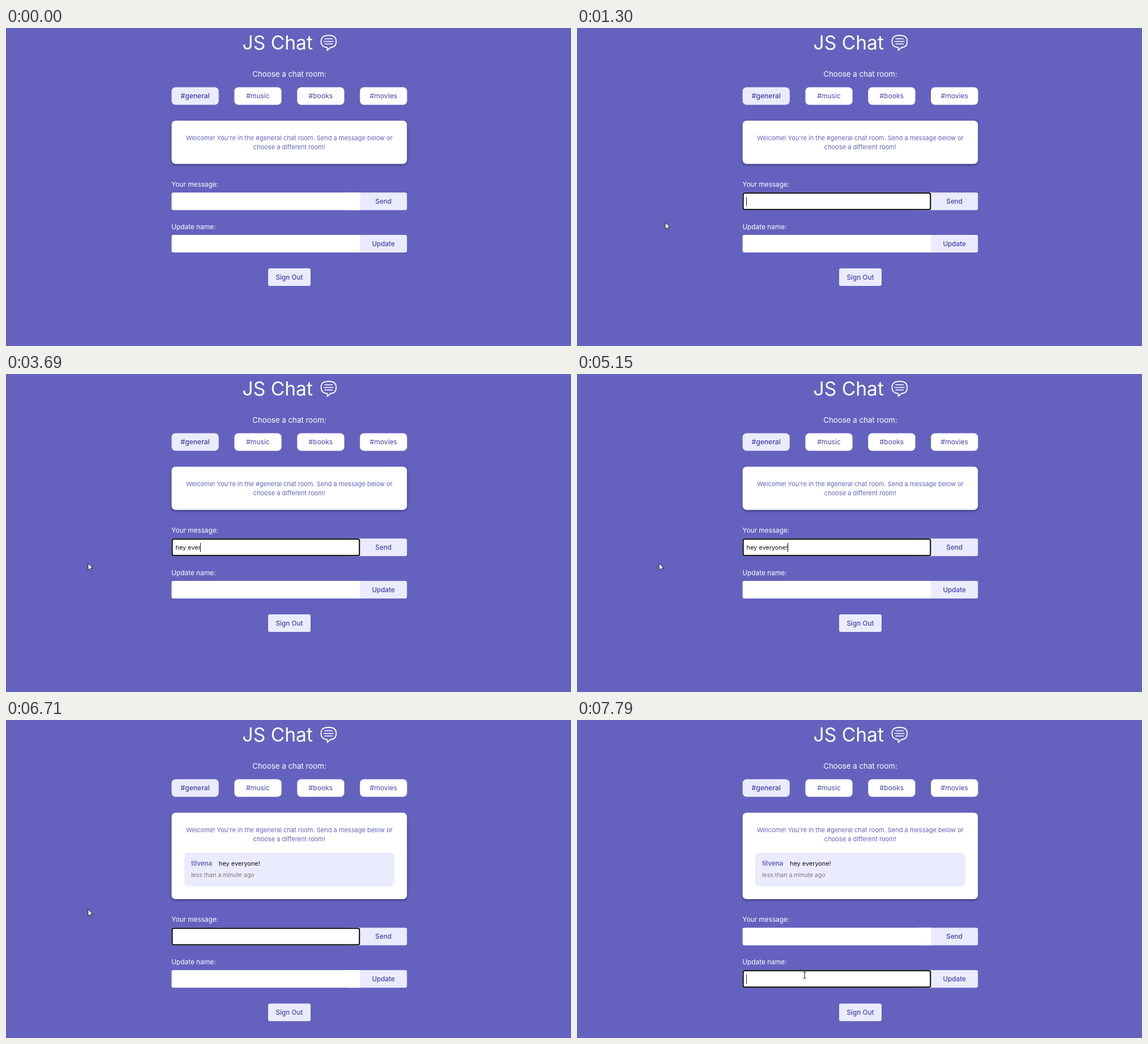
Recreate the animation shown at these times as an HTML page. Size 998 by 561 pixels, loop 8 s.

```html
<!DOCTYPE html>
<html lang="en">
<head>
<meta charset="utf-8">
<title>JS Chat</title>
<style>
  html, body { margin: 0; width: 100%; height: 100%; overflow: hidden; background: #6462be; }
  svg { display: block; width: 998px; height: 561px; }
  text { font-family: Inter, "Open Sans", sans-serif; white-space: pre; }
  .mid { text-anchor: middle; }
  .white { fill: #fff; }
  .title { font-size: 33.6px; }
  .choose { font-size: 13.3px; }
  .label { font-size: 11.8px; }
  .tab { font-size: 12.1px; fill: #4643ac; }
  .on { font-weight: 500; fill: #403ba4; }
  .btn { font-size: 11.7px; font-weight: 500; fill: #4441aa; }
  .welcome { font-size: 11px; fill: #6462be; }
  .name { font-size: 11.5px; font-weight: 600; fill: #6462be; }
  .msg { font-size: 10.9px; fill: #111; }
  .ago { font-size: 10.5px; fill: #777; }
  .pale { fill: #ebebff; }
  .card { filter: drop-shadow(0 2px 2px rgba(20, 20, 60, .5)); }
</style>
</head>
<body>
<svg viewBox="0 0 998 561">
  <rect width="998" height="561" fill="#6462be"/>

  <text class="white title" x="417.5" y="38">JS Chat</text>
  <g fill="none" stroke="#fff" stroke-width="1.8" stroke-linejoin="round" stroke-linecap="round">
    <path d="M567.5 34.5C560 34 556.5 30 556.5 23.5C556.5 16 561 13 570 13S583.2 16 583.2 23.5S579 34.3 573 34.5L567.5 39.5Z"/>
    <path d="M563 19H576.5M561.5 23.7H578M563 28.3H576.5" stroke-width="1.5"/>
  </g>
  <text class="white choose mid" x="500.5" y="86">Choose a chat room:</text>

  <g id="tabs"></g>

  <rect id="card" class="white card" x="292.5" y="163.5" width="415.7" height="76.3" rx="7"/>
  <text class="welcome mid" x="500.5" y="197.5">Welcome! You're in the #general chat room. Send a message below or</text>
  <text class="welcome mid" x="500.5" y="213.5">choose a different room!</text>

  <g id="post">
    <rect class="pale" x="314.7" y="234" width="371.3" height="59.5" rx="7"/>
    <text class="name" x="327" y="257">tilvena</text>
    <text class="msg" x="376" y="257">hey everyone!</text>
    <text class="ago" x="327" y="277">less than a minute ago</text>
  </g>

  <g id="lower">
    <g id="fields"></g>
    <rect class="pale" x="463" y="424" width="75" height="31" rx="3"/>
    <text class="btn mid" x="500.5" y="443.5">Sign Out</text>
    <text id="typed" class="msg" x="299.5" y="309.5"></text>
    <rect id="ring" x="293.5" y="291.3" width="330.8" height="29" rx="2.5" fill="none" stroke="#000" stroke-width="2"/>
    <rect id="caret" width="1" height="16" fill="#111"/>
  </g>

  <g id="pointer">
    <path id="arrow" d="M0 0V11.6L2.7 9.2L4.5 13.2L6.3 12.4L4.6 8.5H8.2Z" fill="#fff" stroke="#000" stroke-width=".8"/>
    <path id="beam" d="M-2.3 -5H-.6L0 -4.5L.6 -5H2.3M0 -4.5V5M-2.3 5.5H-.6L0 5L.6 5.5H2.3" fill="none" stroke="#000"/>
  </g>
</svg>

<script>
const LOOP = 8000;
const SHIFT = 76.2;       // growth of the card when the message arrives
const FIELD_GAP = 74.8;
const FOCUS = 1130, SENT = 5550, CLEARED = 6250, SWITCH = 7680;
const MESSAGE = 'hey everyone!';
const KEYS = [2040, 2160, 2270, 2530, 2970, 3130, 3230, 3690, 3910, 4140, 4340, 4410, 5150];
const CARET_OFF = [[0, FOCUS], [1660, 2040], [4990, 5150], [5680, 6190], [6710, 7240]];

// time, x, y
const PATH = [
  [190, 437, 552], [380, 352, 440], [580, 288, 346], [780, 238, 306], [970, 215, 312],
  [1130, 215, 312], [1300, 156, 343], [1430, 145, 334], [6860, 145, 334],
  [7100, 205, 415], [7290, 300, 482], [7400, 355, 487], [7580, 402, 450]
];

const $ = id => document.getElementById(id);
const show = (id, on) => $(id).setAttribute('visibility', on ? 'visible' : 'hidden');

$('tabs').innerHTML = ['#general', '#music', '#books', '#movies'].map((room, i) => {
  const x = 292.5 + i * 110.9;
  return `<rect class="${i ? 'white' : 'pale'}" x="${x}" y="104.5" width="83.2" height="31" rx="7"/>
    <text class="tab mid${i ? '' : ' on'}" x="${x + 41.6}" y="124.2">${room}</text>`;
}).join('');

$('fields').innerHTML = [['Your message:', 'Send'], ['Update name:', 'Update']].map(([label, action], i) =>
  `<g transform="translate(0 ${i * FIELD_GAP})">
    <text class="white label" x="292.3" y="280">${label}</text>
    <rect class="pale" x="600" y="290.3" width="108.2" height="31" rx="3"/>
    <path class="white" d="M625.3 290.3V321.3H295.5a3 3 0 0 1 -3 -3V293.3a3 3 0 0 1 3 -3Z"/>
    <text class="btn mid" x="666.7" y="309.8">${action}</text>
  </g>`).join('');

const slope = (i, k) => (PATH[i + 1][k] - PATH[i][k]) / (PATH[i + 1][0] - PATH[i][0]);

// Monotone tangent: smooth through waypoints, no overshoot at rests.
function tangent(i, k) {
  if (i === 0) return slope(0, k);
  if (i === PATH.length - 1) return 0;
  const a = slope(i - 1, k), b = slope(i, k);
  return a * b <= 0 ? 0 : 2 * a * b / (a + b);
}

function pointerAt(t) {
  const last = PATH.length - 1;
  if (t >= PATH[last][0]) return PATH[last].slice(1);
  const i = Math.max(0, PATH.findIndex(p => p[0] > t) - 1);
  const p = PATH[i], q = PATH[i + 1], d = q[0] - p[0];
  const u = Math.max(0, (t - p[0]) / d), v = 1 - u;
  return [1, 2].map(k =>
    p[k] * (1 + 2 * u) * v * v + q[k] * u * u * (3 - 2 * u) +
    d * (tangent(i, k) * u * v * v - tangent(i + 1, k) * u * u * v));
}

function drawPointer(t, shift) {
  const [x, y] = pointerAt(t);
  const inField = x > 292 && x < 625 && [0, FIELD_GAP].some(gap => {
    const top = 290.3 + gap + shift;
    return y > top && y < top + 31;
  });
  const shown = t >= PATH[0][0];
  $('pointer').setAttribute('transform', `translate(${x} ${y})`);
  show('arrow', shown && !inField);
  show('beam', shown && inField);
}

function render(t) {
  const sent = t >= SENT;
  const shift = sent ? SHIFT : 0;
  $('card').setAttribute('height', 76.3 + shift);
  $('lower').setAttribute('transform', `translate(0 ${shift})`);
  show('post', sent);

  const count = t < CLEARED ? KEYS.filter(k => k <= t).length : 0;
  const typed = $('typed');
  typed.textContent = MESSAGE.slice(0, count);

  const gap = t >= SWITCH ? FIELD_GAP : 0;
  $('ring').setAttribute('y', 291.3 + gap);
  show('ring', t >= FOCUS);
  $('caret').setAttribute('x', Math.round(299 + (count ? typed.getComputedTextLength() : 0)));
  $('caret').setAttribute('y', 298 + gap);
  show('caret', !CARET_OFF.some(([from, to]) => t >= from && t < to));

  drawPointer(t, shift);
}

let start;
function tick(now) {
  start ??= now;
  render((now - start) % LOOP);
  requestAnimationFrame(tick);
}
render(0);
requestAnimationFrame(tick);
</script>
</body>
</html>
```
